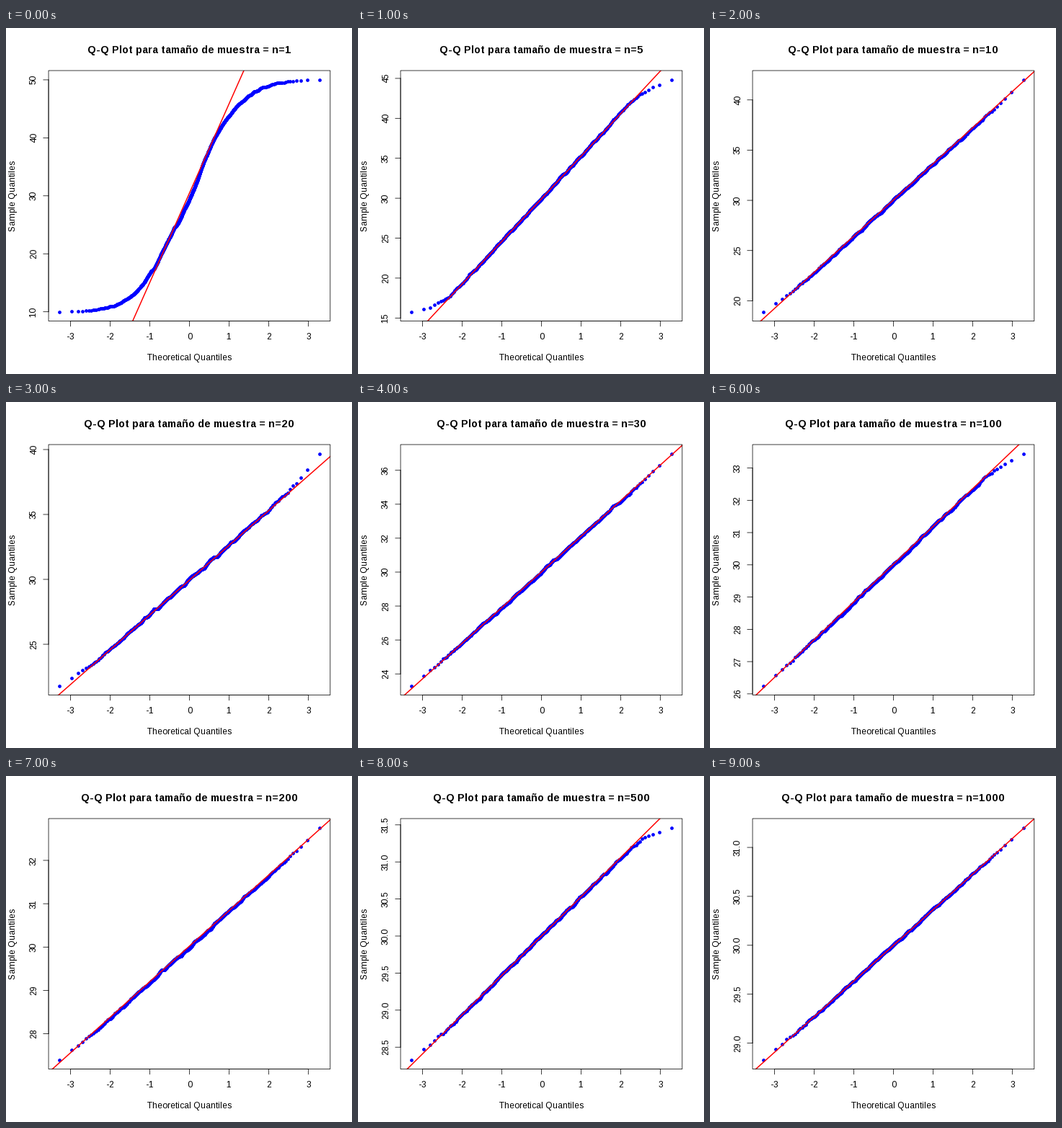
A matplotlib script for the animation above (10 s loop, 480x480 px).

```python
import math

import matplotlib.pyplot as plt
import numpy as np
from matplotlib.animation import FuncAnimation
from matplotlib.patches import Rectangle

plt.rcParams.update({
    "font.family": "Liberation Sans",
    "text.hinting": "force_autohint",
    "text.hinting_factor": 1,
})

SIZE = 480
LEFT, RIGHT, TOP, BOTTOM = 59.04, 449.76, 59.04, 406.56
MID_X, MID_Y = (LEFT + RIGHT) / 2, (TOP + BOTTOM) / 2
COUNT = 1000
TICK = 7.2
TAIL = 2.2
THIN = 0.75

# sample size: (smallest mean, largest mean, slope of the fitted line)
SPECS = {
    1: (10, 50, 15.4),
    5: (15.78, 44.82, 5.33),
    10: (18.9, 42, 3.6),
    20: (21.8, 39.67, 2.68),
    30: (23.3, 36.97, 2.1),
    50: (24.94, 35.42, 1.71),
    100: (26.25, 33.44, 1.17),
    200: (27.4, 32.75, 0.82),
    500: (28.33, 31.46, 0.53),
    1000: (28.83, 31.2, 0.364),
}


def normal_cdf(z):
    return 0.5 * (1 + math.erf(z / math.sqrt(2)))


grid = np.linspace(-4, 4, 4001)
probs = (np.arange(COUNT) + 0.5) / COUNT
quantiles = np.interp(probs, [normal_cdf(z) for z in grid], grid)
Z_MAX = quantiles[-1]


def to_x(z):
    return MID_X + z / (Z_MAX * 1.08) * (RIGHT - LEFT) / 2


def limits(low, high):
    pad = 0.04 * (high - low)
    return low - pad, high + pad


def to_y(value, low, high):
    bottom, top = limits(low, high)
    return BOTTOM - (value - bottom) / (top - bottom) * (BOTTOM - TOP)


def sample(n):
    """Sorted means of samples of size n from a uniform population."""
    low, high, slope = SPECS[n]
    if n == 1:
        uneven = np.sin(np.pi * probs) * np.cos(4 * np.pi * probs)
        values = 10 + 40 * probs - 0.7 * uneven
    else:
        values = 30 + slope * quantiles
        # the tails leave the line to reach the extreme means
        tail = np.clip((abs(quantiles) - TAIL) / (Z_MAX - TAIL), 0, 1) ** 1.5
        gap = np.where(quantiles < 0, low - values[0], high - values[-1])
        values += gap * tail
    knots = np.linspace(-2.9, 2.9, 70)
    noise = np.random.default_rng(n).normal(0, 0.003 * (high - low), 70)
    values += np.interp(quantiles, knots, noise, 0, 0)
    values = np.sort(np.clip(values, low, high))
    values[0], values[-1] = low, high
    return values


def tick_step(span):
    """Round step of 1, 2, 5 or 10 units giving about five intervals."""
    cell = span / 5
    base = unit = 10 ** math.floor(math.log10(cell))
    for factor, bias in ((2, 0.8), (5, 1.7), (10, 0.8)):
        if factor * base - cell < bias * (cell - unit):
            unit = factor * base
        else:
            break
    return unit


samples = {n: sample(n) for n in SPECS}

fig = plt.figure(figsize=(SIZE / 72, SIZE / 72), dpi=72, facecolor="white")
ax = fig.add_axes([0, 0, 1, 1])
ax.set(xlim=(0, SIZE), ylim=(SIZE, 0))
ax.axis("off")


def write(x, y, text, size=12, **style):
    return ax.text(x, y, text, fontsize=size, color="black", ha="center",
                   va="baseline", rotation_mode="anchor", **style)


def stroke(xs, ys):
    return ax.plot(xs, ys, color="black", lw=THIN, snap=False, zorder=4)[0]


frame_box = Rectangle((LEFT, TOP), RIGHT - LEFT, BOTTOM - TOP, fill=False,
                      ec="black", lw=THIN, snap=False, zorder=4)
ax.add_patch(frame_box)
write(MID_X, 461.28, "Theoretical Quantiles")
write(12.96, MID_Y, "Sample Quantiles", rotation=90)
stroke([to_x(-3), to_x(3)], [BOTTOM, BOTTOM])
for z in range(-3, 4):
    stroke([to_x(z)] * 2, [BOTTOM, BOTTOM + TICK])
    write(to_x(z), 432.48, str(z))

dots, = ax.plot([], [], "o", color="blue", ms=4.8, mew=0, antialiased=False,
                zorder=2)
fit, = ax.plot([], [], color="red", lw=2 * THIN, zorder=3)
fit.set_clip_path(frame_box)
title = write(MID_X, 34.7, "", 14.4, weight="bold")
scale_marks = []


def draw_scale(low, high):
    while scale_marks:
        scale_marks.pop().remove()
    bottom, top = limits(low, high)
    step = tick_step(top - bottom)
    first, last = math.ceil(bottom / step), math.floor(top / step)
    ends = [to_y(k * step, low, high) for k in (first, last)]
    scale_marks.append(stroke([LEFT, LEFT], ends))
    for k in range(first, last + 1):
        y = to_y(k * step, low, high)
        label = f"{k * step:.{1 if step < 1 else 0}f}"
        scale_marks.append(stroke([LEFT - TICK, LEFT], [y, y]))
        scale_marks.append(write(41.76, y, label, rotation=90))


def update(i):
    n = list(SPECS)[i]
    low, high, slope = SPECS[n]
    values = samples[n]
    dots.set_data(to_x(quantiles), to_y(values, low, high))
    ends = np.array([-4, 4])
    centre = np.quantile(values, [0.25, 0.75]).mean()
    fit.set_data(to_x(ends), to_y(centre + slope * ends, low, high))
    title.set_text(f"Q-Q Plot para tamaño de muestra = n={n}")
    draw_scale(low, high)
    return [dots, fit, title, *scale_marks]


anim = FuncAnimation(fig, update, frames=len(SPECS), interval=1000,
                     repeat=True, repeat_delay=0, blit=False)
plt.show()
```
